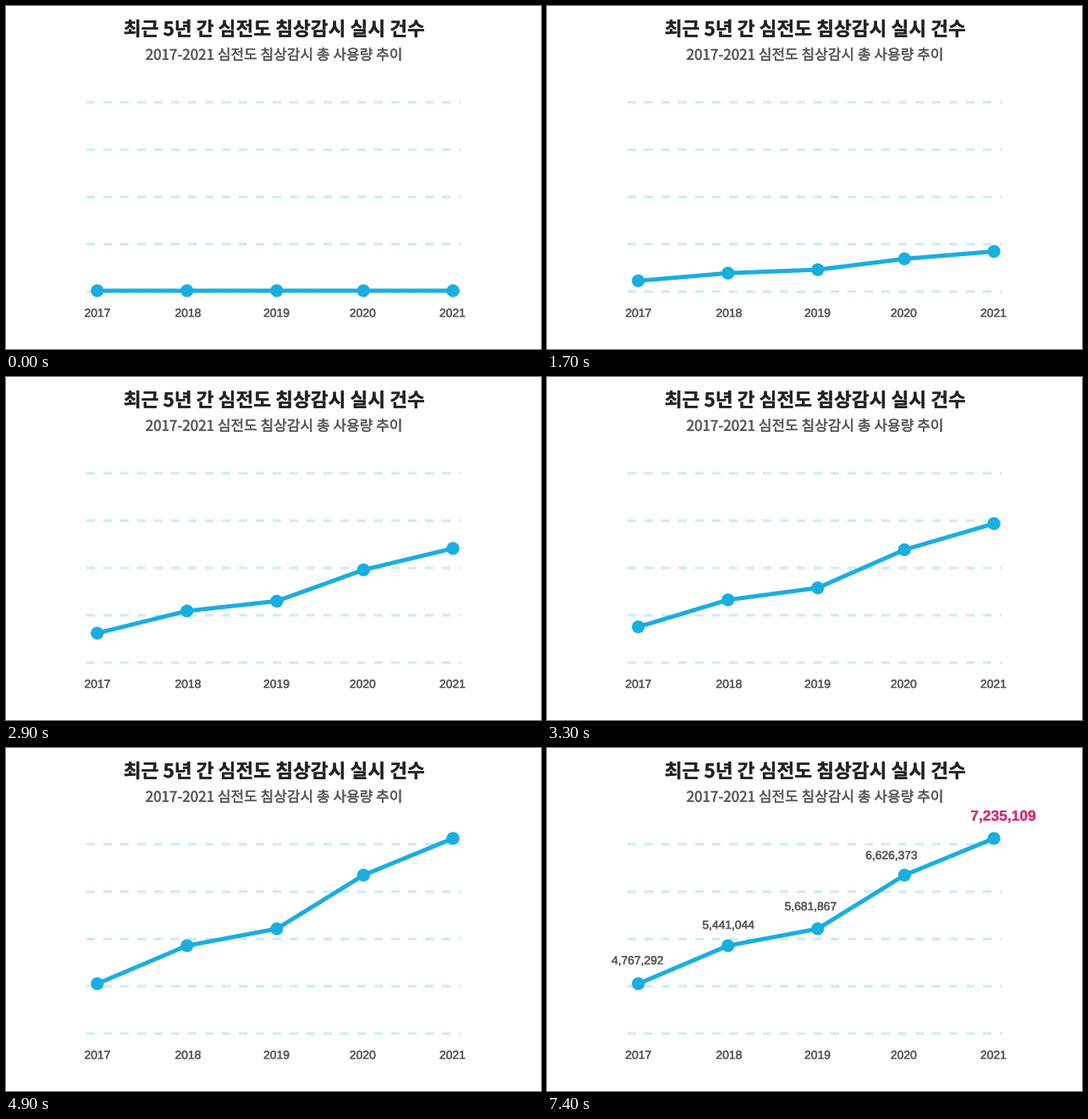
A matplotlib script that plays this animation: 632 by 406 pixels, repeating every 8000 ms.

```python
import numpy as np
import matplotlib.pyplot as plt
from matplotlib.animation import FuncAnimation
from matplotlib.patches import Circle
from matplotlib.patheffects import withStroke

W, H, DPI = 632, 406, 80
STEP, LOOP = 100, 8000
PX = 72 / DPI  # one pixel in points

BLUE, PALE = "#19aee0", "#c9ecf9"
BLACK, GREY, PINK = "#222222", "#58585b", "#d0307a"
LATIN = ["Liberation Sans", "Noto Sans CJK JP"]
HANGUL = ["Noto Sans CJK JP"]

BASE_Y = 337
XS = np.array([107.8, 213.8, 319.8, 422.3, 528])
YS = np.array([279, 234, 214, 150.5, 107])

fig = plt.figure(figsize=(W / DPI, H / DPI), dpi=DPI, facecolor="white")
ax = fig.add_axes([0, 0, 1, 1])
ax.set_xlim(0, W)
ax.set_ylim(H, 0)
ax.axis("off")


def write(x, y, text, size, color=GREY, weight="normal", family=LATIN):
    # a thin outline lifts the regular weight to medium
    outline = 0.2 if weight == "bold" else 0.45
    return ax.text(x, y, text, fontsize=size * PX, color=color, weight=weight,
                   family=family, ha="center", va="baseline", zorder=5,
                   path_effects=[withStroke(linewidth=outline * PX,
                                            foreground=color)])


def ease(t, start, end):
    u = np.clip((t - start) / (end - start), 0, 1)
    return u * u * (3 - 2 * u)


write(316.5, 35, "최근 5년 간 심전도 침상감시 실시 건수", 22.6, BLACK, "bold", HANGUL)
write(316.5, 63.5, "2017-2021 심전도 침상감시 총 사용량 추이", 17, family=HANGUL)

for y in range(114, 339, 56):
    for x in range(95, 537, 20):
        ax.plot([x, min(x + 10, 537)], [y, y], color=PALE, lw=3 * PX,
                solid_capstyle="butt", snap=False, zorder=1)

for x, year in zip([108, 215, 319.5, 421.5, 527.5], range(2017, 2022)):
    write(x, 368, str(year), 13.9)

line, = ax.plot(XS, YS, color=BLUE, lw=5 * PX, solid_joinstyle="round",
                snap=False, zorder=3)
dots = [ax.add_patch(Circle((x, BASE_Y), 7.6, color=BLUE, lw=0, zorder=4))
        for x in XS]

counts = [
    write(107, 256, "4,767,292", 13.8),
    write(214, 214, "5,441,044", 13.8),
    write(311.5, 192, "5,681,867", 13.8),
    write(407, 131.5, "6,626,373", 13.8),
]
latest = write(539, 86, "7,235,109", 17.4, PINK, "bold")


def update(frame):
    t = frame * STEP
    ys = BASE_Y + (YS - BASE_Y) * ease(t, 400, 4900)
    line.set_ydata(ys)
    for dot, x, y in zip(dots, XS, ys):
        dot.center = x, y
    for label in counts:
        label.set_alpha(ease(t, 6300, 7300))
    latest.set_alpha(ease(t, 6300, 7400))
    return [line, *dots, *counts, latest]


anim = FuncAnimation(fig, update, frames=LOOP // STEP, interval=STEP,
                     repeat=True, repeat_delay=0)
plt.show()
```
